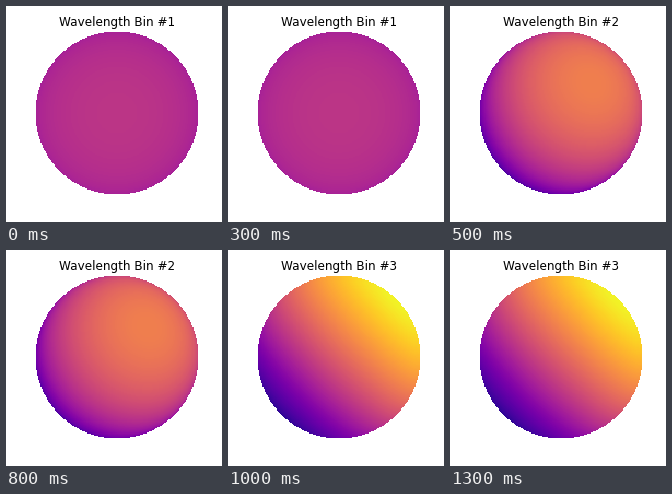
Write a matplotlib script that moves like this. It is 216x216 px and loops after 1.5 s.

```python
import numpy as np
import matplotlib.pyplot as plt
from matplotlib.animation import FuncAnimation

RES = 150
# Per wavelength bin: base level, gradient toward the upper right, centre brightening
BINS = [(0.36, 0.0, 0.08), (0.31, 0.20, 0.32), (0.515, 0.465, 0.075)]

axis = np.linspace(-1, 1, RES)
x, y = np.meshgrid(axis, axis)
r2 = x**2 + y**2
z = np.sqrt(np.where(r2 <= 1, 1 - r2, np.nan))  # NaN outside the disk


def intensity(base, slope, centre):
    return base + slope * (x + y) / np.sqrt(2) + centre * z


fig = plt.figure(figsize=(3, 3), dpi=72, facecolor="white")
ax = fig.add_axes([0.125, 0.125, 0.775, 0.755])
ax.axis("off")
disk = ax.imshow(intensity(*BINS[0]), origin="lower", extent=(-1, 1, -1, 1),
                 cmap="plasma", vmin=0, vmax=1, interpolation="none")
title = ax.set_title("", fontsize=12, fontname="DejaVu Sans")


def draw(i):
    disk.set_data(intensity(*BINS[i]))
    title.set_text(f"Wavelength Bin #{i + 1}")
    return disk, title


anim = FuncAnimation(fig, draw, frames=len(BINS), interval=500,
                     repeat=True, repeat_delay=0, blit=False)
plt.show()
```
